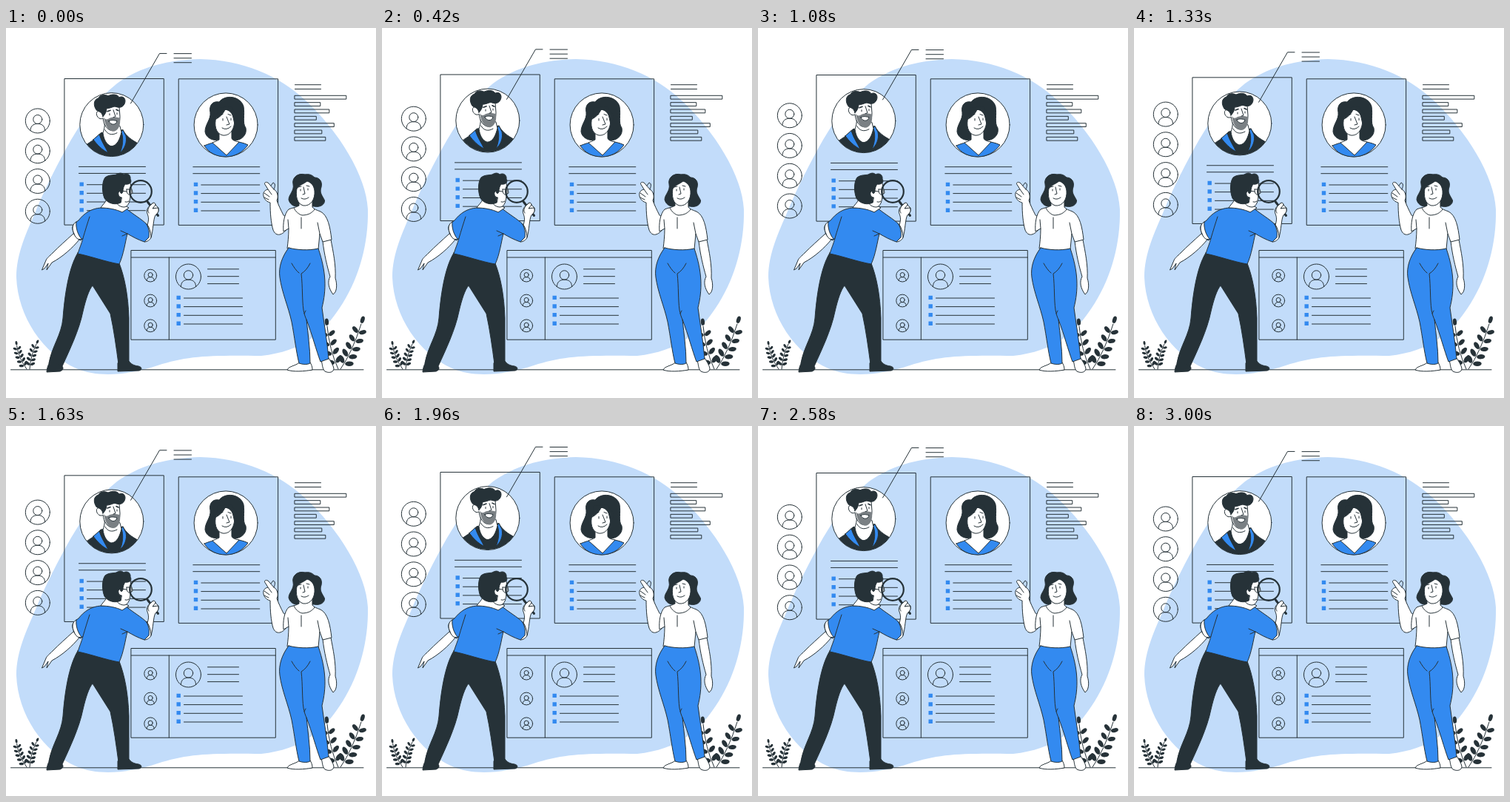
Recreate the animation shown at these times as an HTML page. Size 500 by 500 pixels, loop 3.04 s.

```html
<!DOCTYPE html>
<html lang="en">
<head>
<meta charset="utf-8">
<title>Candidate profiles</title>
<style>
  html, body { margin: 0; height: 100%; overflow: hidden; background: #fff; }
  svg { display: block; width: 100vw; height: 100vh; }
  svg { fill: none; stroke: #263238; stroke-width: 1; stroke-linecap: round; stroke-linejoin: round; }
  .w { fill: #fff; }
  .b { fill: #338af0; }
  .d { fill: #263238; }
  .n { stroke: none; }
  .user * { vector-effect: non-scaling-stroke; }
</style>
</head>
<body>
<svg viewBox="0 0 500 500">
  <defs>
    <g id="user" class="user">
      <circle r="16.5"/>
      <circle cy="-2" r="6"/>
      <path d="M-9.8 13.2C-9.8 7-6 4 0 4S9.8 7 9.8 13.2"/>
    </g>
    <g id="list">
      <path class="b n" d="M99.5 208.7h5.4v5.4h-5.4zm0 11.6h5.4v5.4h-5.4zm0 11.6h5.4v5.4h-5.4zm0 11.6h5.4v5.4h-5.4z"/>
      <path d="M109.5 212H188.5M109.5 223.6H188.5M109.5 235.3H188.5M109.5 247H188.5"/>
    </g>
    <g id="page">
      <path d="M79.3 68.8H213.3V266.4H79.3zM98.5 187.7H188.5M98.5 196.7H188.5"/>
      <circle class="w" cx="142.8" cy="130.9" r="43"/>
      <use href="#list"/>
    </g>
    <clipPath id="disc"><circle cx="142.8" cy="130.9" r="42.8"/></clipPath>
  </defs>

  <path class="n" fill="#c2dcfa" d="M262 42C320 43 370 65 405 98C450 140 487 200 489 245C490 290 478 335 455 372C430 412 400 437 345 443C275 442 245 443 205 456C165 469 125 473 95 460C50 440 16 390 14 337C14 304 28 276 42 243C55 212 70 183 88 151C104 124 122 97 150 75C182 52 220 43 262 42z"/>
  <path d="M6.5 461.8H483"/>

  <g id="column">
    <use href="#user" x="42.8" y="125.6"/>
    <use href="#user" x="42.8" y="166.3"/>
    <use href="#user" x="42.8" y="207.1"/>
    <use href="#user" x="42.8" y="247.9"/>
  </g>

  <g id="card">
    <use href="#page"/>
    <g clip-path="url(#disc)">
      <path class="d" d="M104 160C113 156 121 150 128 142L158 138C162 146 170 152 180 157V178H104z"/>
      <path class="b" d="M118 151L126 144C129 154 135 162 138 169C130 165 123 158 118 151zM158 138L162 146C164 155 160 164 154 169C158 160 159 149 156 141z"/>
      <path class="w" d="M133 128C134 134 132 139 131 142C132 151 136 158 142 160C150 160 154 150 156 141L154 133z"/>
      <path d="M134 138C137 144 143 146 150 142"/>
    </g>
    <path class="w" d="M128 113C124 111 121 114 123 119C125 123 129 124 131 122C132 131 137 139 144 139C151 137 154 129 154 120L153 107L135 105z"/>
    <path class="n" fill="#7a8084" d="M132 121C135 125 137 124 140 122C145 120 150 121 154 122C155 130 153 138 146 140C139 140 134 133 132 121z"/>
    <path class="w" d="M139 126C142 124 147 125 150 126C149 132 141 132 139 126z"/>
    <path class="d" d="M131 120C129 112 125 114 122 111C118 105 118 97 125 95C127 90 134 90 138 92C144 89 151 90 153 94C159 91 163 97 160 103C157 109 151 108 147 106C142 108 139 109 136 109C136 113 134 117 131 120z"/>
    <path d="M145 111L148 120L145 121M140 116V118M150 115V117"/>
    <path stroke-width="1.6" d="M137 113L141 111.500M149 110.500L152 112"/>
    <path d="M168.500 102.200L207.500 34.700H217M227 34.900H250.500M227 41H250.500M227 47H250.500"/>
  </g>

  <use href="#page" x="154.3"/>
  <g>
    <path class="b" d="M268 159C275 156 280 155 286 153H308C315 154 321 155 327 158C320 168 309 174 297 174C285 174 274 169 268 159z"/>
    <path class="d" d="M288 100C279 98 274 105 276 114C277 124 269 130 269 140C270 148 279 153 287 151L310 152C319 151 326 144 324 135C319 128 323 118 321 106C317 92 296 89 288 100z"/>
    <path class="w" d="M288 138V151C284 153 281 154 279 155L298 172L315 154C310 153 306 152 305 149V136z"/>
    <path class="w" d="M284 121C281 130 283 143 293 145C304 146 309 135 309 123C308 116 304 112 298 110C292 111 286 115 284 121z"/>
    <path class="d" d="M284 123C288 121 294 116 296 110C302 111 306 115 307 121L309 130L314 120L304 106L286 108z"/>
    <path d="M298 120L302 130L298 131M292 135Q298 139 304 133M289 118L293 116.500M300 116.500L304 118M293 122.500V125M304 122V124.500"/>
  </g>

  <path d="M390.5 76.7H425.5M390.5 82.5H425.5"/>
  <g id="bars"></g>

  <g>
    <path d="M169.3 300.5H364.3V421.2H169.3zM169.3 310H364.3M220.3 310V421M272.5 325.8H314.5M272.5 335.7H314.5M272.5 345.6H314.5"/>
    <use href="#user" transform="translate(246.5 336) scale(1.03)"/>
    <use href="#user" transform="translate(195.2 334.6) scale(.51)"/>
    <use href="#user" transform="translate(195.2 368.5) scale(.51)"/>
    <use href="#user" transform="translate(195.2 402.3) scale(.51)"/>
    <use href="#list" x="131" y="153"/>
  </g>

  <g id="plants"></g>

  <g id="man">
    <path class="w" d="M91 278C81 287 71 296 63 304C59 308 55 311 54 314L48.500 327L52 325L57 318L55 327L62 317C77 309 90 297 99 286z"/>
    <path class="w" d="M190 286L191 266C193 260 193 256 191 251C189 247 192 241 196 239C198 235 201 236 202 239L206 243C207 246 206 250 202 253C199 257 199 274 196 283z"/>
    <path class="d" d="M97 304L153 318C160 336 165 360 166 392L166 454H152C149 432 146 409 141 386C133 373 125 361 117 348C112 354 108 366 104 383C99 408 86 435 76 457L58 453C62 430 75 415 77 392C79 365 84 325 97 304z"/>
    <path class="d" d="M59 451C57 456 55 460 55 465L73 464C78 462 78 459 75 456zM151 453V464L180 463C184 462 184 458 179 457C172 456 169 454 166 450z"/>
    <path class="b" d="M128 243C115 244 106 250 98 260C92 264 89 267 90 272C91 279 95 284 101 287L104 284C102 292 99 298 97 305C113 308 135 316 153 319C159 306 161 290 164 278C171 282 178 286 187 289L196 283C195 275 193 268 190 265C183 258 172 252 161 243z"/>
    <path class="w" d="M95 262C89 265 89 272 92 278C94 284 98 287 102 285C97 279 94 270 95 262zM190 265C193 271 194 277 193 283L187 289C191 289 195 286 196 283C196 276 193 268 190 265z"/>
    <path d="M104 284C107 274 110 264 113 255M164 278L155 274M164 278L157 281"/>
    <path class="w" d="M136 231C135 236 130 239 128 243C138 243 149 245 157 249L166 243L158 238z"/>
    <path class="w" d="M148 211L168 209C168 215 171 219 171 223L168 225C168 233 166 241 160 242C154 242 151 239 148 235z"/>
    <path class="d" d="M155 236C148 240 137 237 133 230C129 220 130 207 134 202C139 198 146 199 149 198C154 195 157 196 159 198C164 195 169 199 168 204C171 209 166 212 161 211C159 214 158 217 158 221C157 225 154 224 154 220C150 222 152 229 156 229z"/>
    <path d="M155 220L163 221M163 218H169V225C165 226 163 224 163 218M161 235Q164 236 166 234"/>
    <circle cx="182" cy="221" r="14.8" stroke-width="2.2"/>
    <path stroke-width="3" d="M191 234.500L205.500 253.500"/>
    <path class="w" d="M193 250C190 246 193 241 197 238C199 235 202 236 202 239L198 244L205 243C207 246 206 249 203 252"/>
  </g>

  <g id="woman">
    <path class="d" d="M404 198C394 195 386 203 388 211C390 220 382 225 382 232C384 240 392 243 399 240L416 241C425 243 431 238 430.500 233C428 227 423 223 426 215C428 207 423 202 417 202C413 198 409 197 404 198z"/>
    <path class="w" d="M383 246C379 252 377 256 375 253C371 245 368 239 366 233C369 227 366 220 362 218L354 209C350 207 348 210 351 213L354 218C349 219 347 223 348 227C349 232 353 235 357 236C357 250 358 263 361 273C365 283 374 280 380 271z"/>
    <path d="M354 218L359 225M349 223L356 228M349 229L355 232M362 218C364 213 364 210 361 209L358 213"/>
    <path class="w" d="M428 288C430 306 434 322 438 336C434 343 436 352 442 360C447 357 448 347 445 338C446 320 442 302 439 286z"/>
    <path class="w" d="M396 234V240C391 243 386 243 382 245C376 251 374 264 375 275L382 271C382 281 381 290 380 298C393 302 409 301 422 299L424 278L428 289L440 286C438 269 435 253 425 248C420 246 416 245 414 242V234z"/>
    <path d="M389 243C391 248 396 252 400 253C408 253 414 250 417 245M399 256V271M424 278L421 263M382 271L381 259"/>
    <path class="w" d="M393 217C391 226 393 238 402 240C412 241 418 231 417 220C416 213 413 209 407 207C402 211 396 212 393 217z"/>
    <path d="M402 215L404 224L401 225M399 230Q404 233 409 229M395 215L399 214M406 213L410 214M398 218V220M408 217V219"/>
    <path class="w" d="M397 452C390 457 382 457 380 462C388 465 403 464 414 462C414 458 413 455 411 452zM426 449C428 455 427 460 431 464C437 467 443 465 443 460C442 455 439 451 436 446z"/>
    <path class="b" d="M382 297C373 309 368 323 370 337C373 358 381 375 386 397C390 418 392 437 396 453C402 455 407 455 411 453C411 432 408 414 406 394C414 415 419 435 425 451L436 447C434 423 430 401 427 378C433 354 433 330 422 298C409 301 393 300 382 297z"/>
    <path d="M386 318C389 323 392 328 396 331M411 318C408 324 404 329 399 332C401 350 400 367 402 381C403 386 404 390 406 394M403 386L405 382"/>
  </g>
</svg>
<script>
  const $ = id => document.getElementById(id);

  $('bars').innerHTML = [69.5, 34.5, 46.5, 29, 53, 36.5, 41.5]
    .map((w, i) => `<rect x="390.3" y="${91.3 + i * 9.35}" width="${w}" height="4.8"/>`).join('');

  // A curved stem with pairs of leaves and one leaf at the tip
  function plant(x0, y0, cx, cy, x1, y1, pairs, size) {
    let out = `<path d="M${x0} ${y0}Q${cx} ${cy} ${x1} ${y1}"/>`;
    const leaf = (x, y, angle, s) =>
      `<ellipse class="d n" cx="${s * 1.25}" rx="${s}" ry="${s * .56}" transform="translate(${x} ${y}) rotate(${angle})"/>`;
    for (let i = 0; i <= pairs; i++) {
      const u = .15 + .85 * i / pairs, v = 1 - u;
      const x = v * v * x0 + 2 * u * v * cx + u * u * x1;
      const y = v * v * y0 + 2 * u * v * cy + u * u * y1;
      const angle = Math.atan2(v * (cy - y0) + u * (y1 - cy), v * (cx - x0) + u * (x1 - cx)) * 180 / Math.PI;
      const s = size * (1.1 - .2 * u);
      out += i < pairs ? leaf(x, y, angle - 58, s) + leaf(x, y, angle + 58, s) : leaf(x, y, angle, s);
    }
    return out;
  }
  $('plants').innerHTML =
    plant(28, 461, 17, 446, 14.5, 429, 5, 3) +
    plant(32, 461, 33, 443, 41, 427, 5, 3) +
    plant(449, 461, 437, 435, 434, 403, 4, 5.2) +
    plant(452, 461, 468, 438, 480, 400, 5, 5.4);

  // Linear rise of 10 and return within one period
  const rise = (t, period) => {
    const u = t % period / period;
    return -20 * Math.min(u, 1 - u);
  };
  const move = (id, y) => $(id).setAttribute('transform', `translate(0 ${y})`);

  function draw(now) {
    // 24 steps per second, each posed at its middle
    const t = (Math.floor((now % 3040 + 5) * .024) + .5) / .024;
    move('card', rise(t, 1500));
    move('column', rise(t, 3000));
    requestAnimationFrame(draw);
  }
  draw(performance.now());
</script>
</body>
</html>
```
